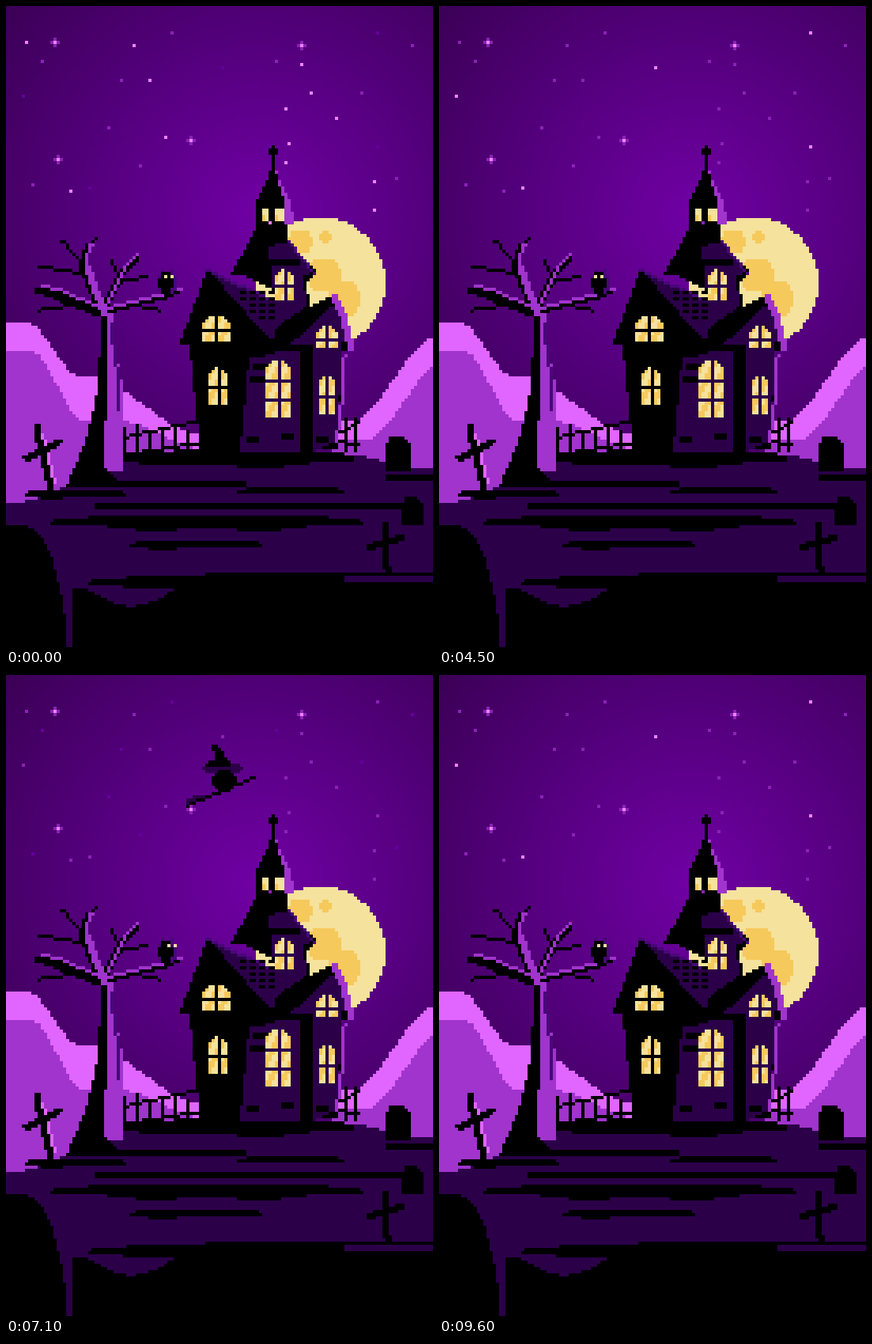
Recreate the animation shown at these times as an HTML page with a canvas. Size 540 px wide and 810 px high, loop 9700 ms.

```html
<!DOCTYPE html>
<html lang="en">
<head>
<meta charset="utf-8">
<title>Haunted house</title>
<style>
html, body { margin: 0; width: 100%; height: 100%; overflow: hidden; background: #000; }
canvas { position: absolute; left: 0; top: 0; width: 540px; height: 812px; image-rendering: pixelated; }
</style>
</head>
<body>
<canvas id="stage" width="135" height="203"></canvas>
<script>
const CELL = 4, COLS = 135, ROWS = 203, LOOP = 9700, STEP = 100;
const BLACK = '#000', DARK = '#2b0049', DUSK = '#480878', MID = '#a034cc', PINK = '#e066ff';
const PALE = '#f5e29c', GOLD = '#f6c95c';
const STAR = { faint: '#65009b', dim: '#8b22b5', bright: '#ed82ff' };
const screen = document.getElementById('stage').getContext('2d');
const scene = document.createElement('canvas');
scene.width = COLS;
scene.height = ROWS;
let g = scene.getContext('2d');

const parse = text => text.split(' ').map(p => p.split(',').map(Number));

function smooth(from, to, v) {
  const k = Math.min(1, Math.max(0, (v - from) / (to - from)));
  return k * k * (3 - 2 * k);
}

// Small repeatable generator for the scattered details.
let seed = 7;
const random = () => (seed = seed * 16807 % 2147483647) / 2147483647;

// All coordinates are stage pixels, snapped to the 4 px grid.
function box(color, x, y, w, h) {
  g.fillStyle = color;
  g.fillRect(Math.round(x / CELL), Math.round(y / CELL), Math.round(w / CELL), Math.round(h / CELL));
}

// Fills row by row between two edges given as functions of y.
function rows(color, top, bottom, left, right) {
  for (let y = top; y < bottom; y += CELL) {
    const a = Math.round(left(y) / CELL) * CELL, b = Math.round(right(y) / CELL) * CELL;
    if (b > a) box(color, a, y, b - a, CELL);
  }
}

// Fills column by column from an edge down to a floor.
function below(color, from, to, edge, floor) {
  for (let x = from; x < to; x += CELL) {
    const y = Math.round(edge(x) / CELL) * CELL;
    box(color, x, y, CELL, Math.max(0, floor - y));
  }
}

function poly(color, text) {
  const pts = parse(text);
  for (let y = 0; y < ROWS * CELL; y += CELL) {
    const hits = [];
    pts.forEach(([x1, y1], i) => {
      const [x2, y2] = pts[(i + 1) % pts.length], mid = y + CELL / 2;
      if ((y1 <= mid) !== (y2 <= mid)) hits.push(x1 + (mid - y1) * (x2 - x1) / (y2 - y1));
    });
    hits.sort((a, b) => a - b);
    for (let i = 0; i + 1 < hits.length; i += 2) rows(color, y, y + CELL, () => hits[i], () => hits[i + 1]);
  }
}

function line(color, text, size = CELL) {
  parse(text).forEach(([x2, y2], i, pts) => {
    const [x1, y1] = pts[Math.max(0, i - 1)];
    const steps = Math.max(1, Math.ceil(Math.max(Math.abs(x2 - x1), Math.abs(y2 - y1)) / CELL));
    for (let s = 0; s <= steps; s++) {
      box(color, x1 + (x2 - x1) * s / steps - size / 2, y1 + (y2 - y1) * s / steps - size / 2, size, size);
    }
  });
}

function disc(color, cx, cy, rx, ry = rx) {
  const half = y => rx * Math.sqrt(Math.max(0, 1 - ((y + 2 - cy) / ry) ** 2));
  rows(color, Math.floor((cy - ry) / CELL) * CELL, cy + ry, y => cx - half(y), y => cx + half(y));
}

// A tapered horizontal band with slightly ragged edges.
function streak(color, x1, x2, y, thick) {
  below(color, x1, x2, x => y - thick / 2 * taper(x), y + CELL);
  for (let x = x1; x < x2; x += CELL) {
    box(color, x, y, CELL, thick / 2 * taper(x) + 2 * Math.sin(x / 23));
  }
  function taper(x) {
    return Math.sqrt(Math.sin(Math.PI * (x - x1 + 2) / (x2 - x1 + 4)));
  }
}

// An arched window: lit panes with a mullion and cross bars.
function litWindow(x, y, w, h, bars, frame = DARK) {
  for (let dy = 0; dy < h; dy += CELL) {
    const inset = Math.max(0, 8 - dy);
    for (let dx = inset; dx < w - inset; dx += CELL) {
      box((dx * 2 + dy) % 32 < 16 ? GOLD : PALE, x + dx, y + dy, CELL, CELL);
    }
  }
  box(frame, x + w / 2 - 2, y, CELL, h);
  for (let i = 1; i <= bars; i++) box(frame, x, y + h * i / (bars + 1), w, CELL);
}

function sky() {
  const glow = g.createRadialGradient(80, 66, 0, 80, 66, 108);
  glow.addColorStop(0, '#7000a4');
  glow.addColorStop(.5, '#54007d');
  glow.addColorStop(1, '#390052');
  g.fillStyle = glow;
  g.fillRect(0, 0, COLS, ROWS);
  disc(PALE, 397, 350, 83);
  disc(GOLD, 372, 298, 16);
  disc(GOLD, 404, 292, 8);
  disc(GOLD, 402, 340, 22);
  disc(GOLD, 428, 370, 20, 24);
}

function hills() {
  const left = x => 400 + 68 * smooth(24, 92, x) + 72 * smooth(100, 244, x);
  const right = x => 524 - 104 * smooth(436, 540, x);
  below(PINK, 0, 260, left, 640);
  below(MID, 0, 260, x => 436 + 88 * smooth(30, 96, x) + 36 * smooth(140, 250, x), 640);
  below(PINK, 412, 540, right, 600);
  below(MID, 412, 540, x => right(x - 16) + 24, 600);
}

function fences() {
  for (let x = 148; x < 248; x += 16) line(BLACK, `${x},${536 - x % 12} ${x},${572 - (x - 148) / 6}`);
  line(BLACK, '146,546 244,524');
  line(BLACK, '146,568 244,552');
  [430, 442].forEach(x => line(BLACK, `${x},522 ${x},560`));
  line(BLACK, '422,538 444,526');
  line(BLACK, '422,550 444,554');
}

function ground() {
  const crest = x => 628 - 62 * smooth(0, 190, x) + 20 * smooth(420, 540, x);
  below(DARK, 0, 540, crest, 812);
  streak(BLACK, 148, 440, 570, 20);
  streak(BLACK, 24, 150, 616, 12);
  streak(BLACK, 110, 300, 602, 8);
  streak(BLACK, 290, 424, 612, 8);
  streak(BLACK, 480, 560, 594, 8);
  streak(BLACK, 110, 500, 630, 8);
  streak(BLACK, 56, 450, 652, 20);
  streak(BLACK, 156, 324, 680, 12);
  streak(BLACK, 104, 700, 728, 24);
  below(BLACK, 84, 540, x => 734 + 24 * smooth(84, 150, x) - 34 * smooth(160, 250, x), 812);
  streak(DARK, 428, 560, 722, 8);
  below(BLACK, 0, 76, x => 656 + 140 * Math.pow(x / 76, 4), 812);
}

function graves() {
  const stone = (x, y, w, h) => poly(BLACK, `${x},${y + h} ${x},${y + 12} ${x + 8},${y} ${x + w - 8},${y} ${x + w},${y + 12} ${x + w},${y + h}`);
  stone(478, 544, 34, 44);
  stone(498, 620, 30, 36);
  line(BLACK, '480,656 482,712', 8);
  line(BLACK, '460,684 498,672', 8);
  line(PINK, '46,540 62,600');
  line(BLACK, '38,532 56,606', 8);
  line(BLACK, '22,570 70,548');
  line(BLACK, '28,570 64,552', 8);
}

function tree() {
  const flare = y => 40 * Math.pow(Math.max(0, y - 440) / 160, 2);
  const limbs = ['122,390 96,326 104,304', '120,388 60,362 40,358', '120,386 150,330 162,318', '122,386 200,366 216,360'];
  const twigs = ['96,326 70,296', '98,338 40,328', '100,312 112,294', '84,378 40,384', '138,350 178,342', '142,340 132,322', '172,380 194,384'];
  rows(MID, 384, 588, y => 120 - flare(y) / 2, y => 134 + 14 * smooth(400, 490, y));
  line(DUSK, '132,400 142,470 142,510');
  rows(BLACK, 388, 606, y => 118 - flare(y), y => 128 - flare(y) / 5 + 28 * smooth(576, 606, y));
  twigs.forEach(t => line(BLACK, t));
  limbs.forEach(l => line(BLACK, l, 8));
  g.save();
  g.translate(1, -1);
  limbs.forEach(l => line(MID, l));
  g.restore();
  line(MID, '102,330 124,388', 8);
  line(BLACK, '40,358 116,388', 8);
}

function owl() {
  disc(DUSK, 204, 350, 12, 16);
  box(DUSK, 196, 332, 4, 8);
  box(DUSK, 208, 332, 4, 8);
  disc(BLACK, 202, 350, 9, 14);
}

function tower() {
  const spire = y => 22 * smooth(196, 258, y);
  rows(MID, 208, 276, () => 338, y => 340 + spire(y));
  rows(BLACK, 188, 280, y => 336 - spire(y), y => 340 + spire(y) * .6);
  box(BLACK, 336, 176, 4, 16);
  box(BLACK, 332, 180, 12, 8);
  [[324, 8], [340, 12]].forEach(([x, w]) => {
    box(PALE, x, 256, w, 16);
    box(GOLD, x, 264, 4, 8);
  });
  poly(BLACK, '318,276 356,276 358,298 392,336 380,348 384,384 300,340 284,340 306,300');
  poly(DARK, '332,304 356,298 388,336 376,340 380,380 340,376');
  line(DUSK, '358,298 390,336');
  box(BLACK, 336, 320, 36, 8);
  litWindow(340, 332, 24, 40, 1);
}

function house() {
  poly(BLACK, '254,334 338,374 384,380 412,366 438,432 424,436 420,560 246,570 232,430 220,426');
  poly(DARK, '262,340 338,372 380,380 344,404 336,424 290,372');
  line(DUSK, '254,334 332,370');
  for (let y = 360; y < 400; y += 8) {
    for (let x = 290 + (y - 360) * .8; x < 336; x += 12) box(BLACK, x + y % 16 / 2, y, 8, CELL);
  }
  poly(DARK, '414,372 428,408 424,436 420,548 388,564 388,432 350,424 372,412');
  poly(DARK, '308,440 372,436 372,564 296,564');
  line(BLACK, '410,374 372,412 344,426', 8);
  line(MID, '416,368 428,396 436,430', 8);
  line(MID, '428,440 424,500 418,548');
  box(BLACK, 304, 428, 84, 8);
  box(BLACK, 372, 432, 16, 132);
  for (let i = 0; i < 3; i++) {
    box(BLACK, 308 + i % 2 * 4, 434 + i * 16, 18, 8);
    box(BLACK, 304 + i * 44, 544 - i % 2 * 4, 16, 8);
  }
  litWindow(248, 392, 36, 32, 1, BLACK);
  litWindow(256, 456, 24, 48, 1, BLACK);
  litWindow(328, 448, 32, 72, 2);
  litWindow(392, 404, 28, 28, 1);
  litWindow(396, 464, 20, 52, 1);
}

// Twinkling groups: each is brightest around its own point of the cycle.
const groups = [
  { peak: .49, stars: parse('470,34 274,78 22,114 470,178 106,230') },
  { peak: .78, stars: parse('46,70 210,34 514,50 342,70 146,94 450,110 130,154 170,202 34,226 494,218') },
  { peak: .92, stars: [] }
];
for (let i = 0; i < 14; i++) {
  groups[2].stars.push([26 + Math.floor(random() * 120) * CELL, 30 + Math.floor((i + random()) * 4.5) * CELL]);
}

function stars(frame) {
  const phase = frame * 40 / 97 % 1;
  for (const { peak, stars } of groups) {
    const away = Math.abs((phase - peak + 1.5) % 1 - .5);
    const color = away < .12 ? STAR.bright : away < .42 ? STAR.dim : STAR.faint;
    for (const [x, y] of stars) box(color, x - 2, y - 2, CELL, CELL);
  }
  for (const [x, y] of parse('62,46 374,50 234,170 66,194')) {
    box(STAR.dim, x - 6, y - 2, 12, CELL);
    box(STAR.dim, x - 2, y - 6, CELL, 12);
    box(STAR.bright, x - 2, y - 2, CELL, CELL);
  }
}

// The owl looks aside, then ahead, in turn.
function eyes(frame) {
  const turn = [9, 42, 71, 88].findIndex(middle => Math.abs(frame - middle) < 5);
  const x = turn < 0 ? 200 : turn % 2 ? 196 : 204;
  box(PALE, x, 340, CELL, CELL);
  box(PALE, x + 8, 340, CELL, CELL);
}

// Crosses the sky on a shallow arc, lowest point at frame 75.
function witch(frame) {
  const t = frame - 71;
  if (t < -16 || t > 17) return;
  g.save();
  g.translate(Math.round((144 + 20 * t - .07 * t * t) / CELL), Math.round((27.6 - .231 * (t - 4) ** 2) / CELL));
  poly(DARK, '100,96 112,88 140,86 156,92 148,100 136,104');
  poly(BLACK, '116,64 124,64 140,88 136,92 104,92 120,82');
  disc(BLACK, 132, 110, 16, 14);
  poly(DARK, '80,136 96,128 112,128 88,144');
  line(BLACK, '170,106 84,142');
  g.restore();
}

[sky, hills, fences, ground, tree, graves, owl, tower, house].forEach(draw => draw());
g = screen;

function render(now) {
  const frame = Math.floor(now % LOOP / STEP);
  g.drawImage(scene, 0, 0);
  witch(frame);
  stars(frame);
  eyes(frame);
  requestAnimationFrame(render);
}
requestAnimationFrame(render);
</script>
</body>
</html>
```
